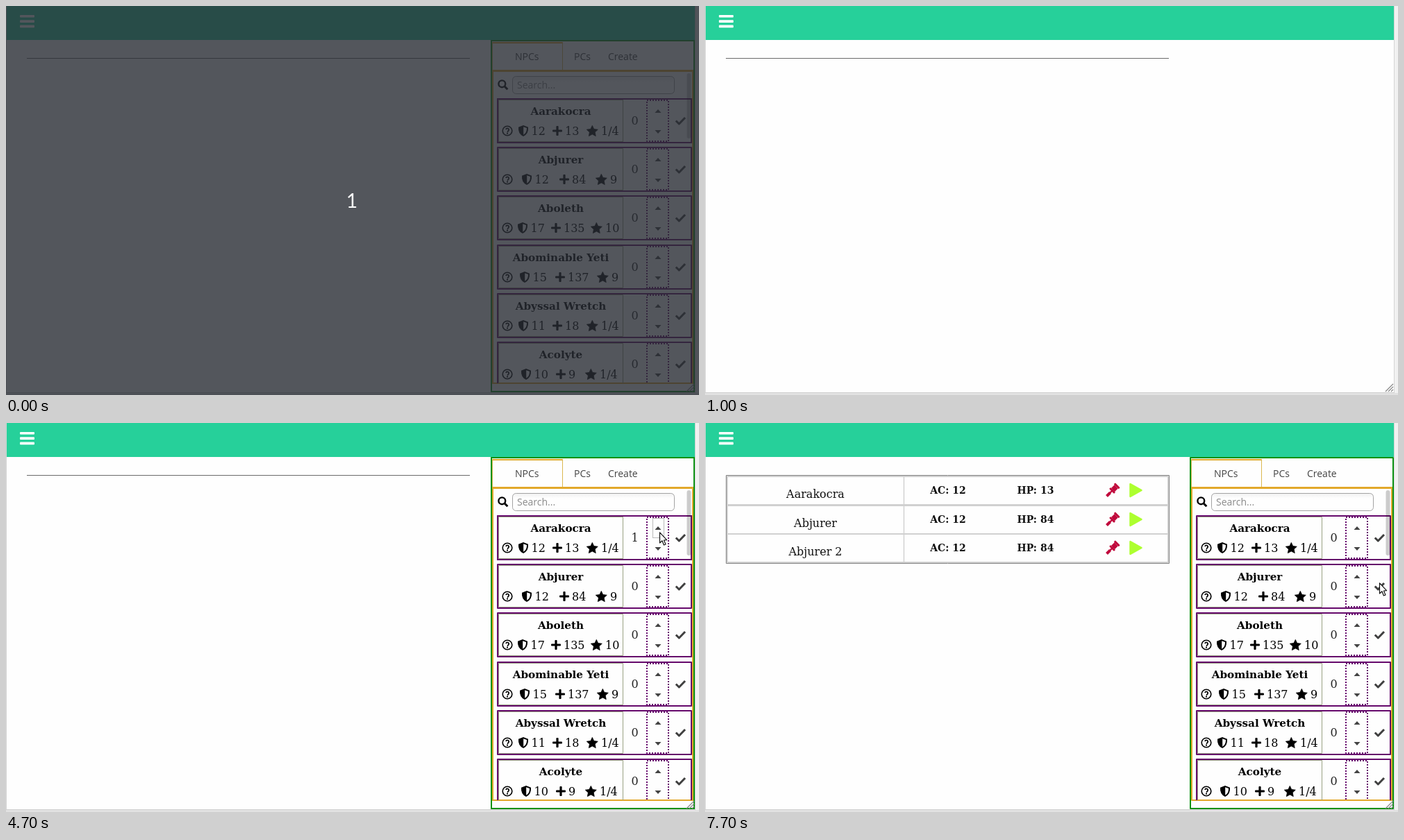
Recreate the animation shown at these times as an HTML page with a canvas. Size 998 by 561 pixels, loop 8 s.

```html
<!DOCTYPE html>
<html lang="en">
<head>
<meta charset="utf-8">
<title>Encounter tracker</title>
<style>
  html, body { margin: 0; width: 100%; height: 100%; overflow: hidden; background: #fefefe; }
  canvas { display: block; }
</style>
</head>
<body>
<canvas id="stage" width="998" height="561"></canvas>
<script>
const ctx = document.getElementById('stage').getContext('2d');
const LOOP = 8000;
const SERIF = '"DejaVu Serif", serif';
const SANS = '"Open Sans", "Noto Sans", sans-serif';
const PURPLE = '#65086b';
const GOLD = '#e2a82a';

// x: left edges of the shield, plus and star icons
const npcs = [
  { name: 'Aarakocra', ac: 12, hp: 13, cr: '1/4', x: [738, 787, 836] },
  { name: 'Abjurer', ac: 12, hp: 84, cr: '9', x: [743, 797, 849] },
  { name: 'Aboleth', ac: 17, hp: 135, cr: '10', x: [737, 785, 842] },
  { name: 'Abominable Yeti', ac: 15, hp: 137, cr: '9', x: [740, 791, 851] },
  { name: 'Abyssal Wretch', ac: 11, hp: 18, cr: '1/4', x: [738, 787, 836] },
  { name: 'Acolyte', ac: 10, hp: 9, cr: '1/4', x: [742, 792, 834] }
];

// [time, x, y] of the pointer tip, held until the next entry
const pointer = [
  [1900, 956, 164], [2100, 918, 144], [2300, 930, 145], [2400, 947, 146],
  [2700, 954, 147], [3200, 942, 145], [3300, 936, 147], [3400, 930, 150],
  [3500, 928, 151], [4700, 941, 157], [4800, 958, 167], [4900, 969, 172],
  [5700, 965, 180], [5800, 955, 199], [5900, 945, 215], [6000, 940, 223],
  [6900, 948, 226], [7000, 961, 229], [7100, 972, 230], [7200, 971, 230]
];

const between = (t, a, b) => t >= a && t < b;

function rect(color, x, y, w, h) {
  ctx.fillStyle = color;
  ctx.fillRect(x, y, w, h);
}

function frame(color, x, y, w, h, line = 1) {
  ctx.strokeStyle = color;
  ctx.lineWidth = line;
  ctx.strokeRect(x + line / 2, y + line / 2, w - line, h - line);
}

function text(str, x, y, font, color = '#000', align = 'left') {
  ctx.font = font;
  ctx.fillStyle = color;
  ctx.textAlign = align;
  ctx.fillText(str, x, y);
}

function poly(points, color) {
  ctx.beginPath();
  points.forEach(([x, y]) => ctx.lineTo(x, y));
  ctx.closePath();
  if (color) {
    ctx.fillStyle = color;
    ctx.fill();
  }
}

function lines(color, width, ...paths) {
  ctx.strokeStyle = color;
  ctx.lineWidth = width;
  ctx.beginPath();
  for (const path of paths) {
    path.forEach(([x, y], i) => i ? ctx.lineTo(x, y) : ctx.moveTo(x, y));
  }
  ctx.stroke();
}

function pill(color, x, y, w, h, r) {
  ctx.fillStyle = color;
  ctx.beginPath();
  ctx.roundRect(x, y, w, h, r);
  ctx.fill();
}

function at(x, y, draw) {
  ctx.save();
  ctx.translate(x, y);
  draw();
  ctx.restore();
}

function helpIcon(x, y) {
  ctx.strokeStyle = '#000';
  ctx.lineWidth = 1.6;
  ctx.beginPath();
  ctx.arc(x, y, 6.8, 0, Math.PI * 2);
  ctx.stroke();
  ctx.lineWidth = 1.7;
  ctx.beginPath();
  ctx.arc(x, y - 1.5, 2.1, Math.PI * 1.08, Math.PI * 2.3);
  ctx.lineTo(x, y + 1.6);
  ctx.stroke();
  rect('#000', x - 1, y + 2.6, 2, 2);
}

function shieldIcon(x, y) {
  at(x, y, () => {
    ctx.fillStyle = '#000';
    ctx.fill(new Path2D('M7-8L14-5.2Q14.8 4.5 7 8Q-.8 4.5 0-5.2Z'));
    ctx.fillStyle = '#fefefe';
    ctx.fill(new Path2D('M7.2-5.8L12-3.9Q12.2 3 7.2 5.7Z'));
  });
}

function plusIcon(x, y) {
  pill('#000', x, y - 1.6, 14, 3.2, 1);
  pill('#000', x + 5.4, y - 7, 3.2, 14, 1);
}

function starIcon(x, y) {
  const points = Array.from({ length: 10 }, (_, i) => {
    const r = i % 2 ? 4.1 : 8.4;
    const a = Math.PI * (i / 5 - 0.5);
    return [x + 8.3 + r * Math.cos(a), y + 0.8 + r * Math.sin(a)];
  });
  poly(points, '#000');
  ctx.strokeStyle = '#000';
  ctx.lineWidth = 0.8;
  ctx.lineJoin = 'round';
  ctx.stroke();
}

function gavelIcon(x, y) {
  at(x, y, () => {
    ctx.rotate(Math.PI / 4);
    const red = '#c00a3c';
    pill(red, -5, -9.6, 10, 3, 1.2);
    rect(red, -3.6, -6.6, 7.2, 6.4);
    pill(red, -5, -0.2, 10, 3, 1.2);
  });
}

function gavel(x, y) {
  gavelIcon(x + 0.5, y - 0.5);
  lines('#c00a3c', 4, [[x - 8.5, y + 8.5], [x - 3.5, y + 3.5]]);
  lines('#c00a3c', 2.4, [[x - 4, y + 4], [x + 2, y - 2]]);
}

function playIcon(x, y) {
  ctx.lineJoin = 'round';
  poly([[x + 1.5, y - 9], [x + 17.5, y], [x + 1.5, y + 9]], '#adff2f');
  ctx.strokeStyle = '#adff2f';
  ctx.lineWidth = 2.5;
  ctx.stroke();
}

function dotted(color, x, y, w, h, line) {
  ctx.setLineDash([line, line]);
  frame(color, x, y, w, h, line);
  ctx.setLineDash([]);
}

function grip() {
  lines('#888', 1.2,
    [[980, 556], [991, 545]], [[984, 556], [991, 549]], [[988, 556], [991, 553]]);
}

function blank() {
  rect('#fefefe', 0, 0, 998, 561);
  rect('#f1f1f1', 993, 0, 5, 561);
  rect('#e1e1e1', 0, 558, 998, 3);
  rect('#d4d4d4', 0, 0, 1, 558);
  rect('#d4d4d4', 992, 0, 1, 558);
  rect('#d0d0d0', 0, 557, 993, 1);
}

function header() {
  rect('#26d09a', 1, 0, 991, 49);
  for (const y of [13, 20.3, 27.6]) pill('#fff', 20, y, 21, 3.6, 1);
}

function table(count) {
  if (!count) {
    rect('#6a6a6a', 30, 75, 638, 1);
    return;
  }
  const list = [['Aarakocra', 12, 13], ['Abjurer', 12, 84], ['Abjurer 2', 12, 84]];
  const bold = 'bold 14px ' + SERIF;
  const height = Math.round(44.5 + 41.5 * (count - 1));
  frame('#858585', 30, 75, 639, height);
  for (let i = 0; i < count; i++) {
    const y = Math.round(41.5 * i);
    const [name, ac, hp] = list[i];
    frame('#d0d0d0', 31, 76 + y, 637, 43, 2);
    rect('#c2c2c2', 286, 78 + y, 1, 39);
    text(name, 159, 108 + y, '16px ' + SERIF, '#111', 'center');
    text('AC: ' + ac, 350, 102 + y, bold, '#111', 'center');
    text('HP: ' + hp, 476, 102 + y, bold, '#111', 'center');
    gavel(587, 97 + y);
    playIcon(611, 97 + y);
  }
}

function panel() {
  frame('#0b9212', 698, 49, 294, 508, 2);
  rect(GOLD, 700, 52, 102, 2);
  rect('#dcb850', 700, 52, 1, 41);
  rect('#dcb850', 801, 52, 1, 41);
  rect(GOLD, 700, 92, 290, 3);
  frame(GOLD, 700, 93, 290, 452, 2);
  text('NPCs', 733, 78, '14px ' + SANS, '#444');
  text('PCs', 818, 78, '14px ' + SANS, '#444');
  text('Create', 867, 78, '14px ' + SANS, '#444');
}

function search() {
  ctx.strokeStyle = '#000';
  ctx.lineWidth = 2.4;
  ctx.beginPath();
  ctx.arc(714.3, 112.3, 4.9, 0, Math.PI * 2);
  ctx.stroke();
  lines('#000', 3, [[717.8, 115.8], [722.3, 120.3]]);

  const shade = ctx.createLinearGradient(0, 101, 0, 127);
  shade.addColorStop(0, '#f0f0f0');
  shade.addColorStop(0.3, '#fefefe');
  pill(shade, 729.5, 101.5, 233, 25, 5);
  ctx.strokeStyle = '#a3a3a3';
  ctx.lineWidth = 1;
  ctx.stroke();
  text('Search...', 736, 119, '14px ' + SANS, '#8a8a8a');
}

function npcRow(npc, y, count, pressed) {
  const [shield, plus, star] = npc.x;
  const mid = y + 47;
  const base = y + 53;
  const num = '16px ' + SERIF;
  frame(PURPLE, 707, y, 281, 65, 2);
  frame('#9aa184', 709, y + 2, 180, 61);
  text(npc.name, 799, y + 24, 'bold 15.2px ' + SERIF, '#000', 'center');
  helpIcon(722, mid);
  shieldIcon(shield, mid);
  plusIcon(plus, mid);
  starIcon(star, mid);
  text(npc.ac, shield + 18.5, base, num);
  text(npc.hp, plus + 18, base, num);
  text(npc.cr, star + 21, base, num);

  text(count, 905.5, y + 38, num, '#222', 'center');
  dotted(PURPLE, 922, y + 2, 33, 61, 2);
  const up = y + 16 + (pressed ? 1 : 0);
  poly([[934.5, up + 5], [939, up], [943.5, up + 5]], '#444');
  poly([[934.5, y + 46], [943.5, y + 46], [939, y + 51]], '#444');
  lines('#404040', 3, [[964.8, y + 32.5], [969.3, y + 37], [978, y + 28]]);
}

function counts(t) {
  const first = between(t, 3900, 5400) ? 1 : 0;
  const second = between(t, 6400, 6500) ? 1 : between(t, 6500, 7700) ? 2 : 0;
  return [first, second];
}

function focus(t) {
  if (between(t, 3700, 5400)) dotted('#777', 931, 137, 17, 29, 1);
  if (between(t, 6200, 7400)) dotted('#777', 931, 207, 17, 29, 1);
  if (between(t, 7400, 7700)) dotted('#777', 960, 205, 22, 61, 1);
}

function list(t) {
  const value = counts(t);
  const pressed = [between(t, 3700, 3900), between(t, 6200, 6400)];
  ctx.save();
  ctx.beginPath();
  ctx.rect(702, 95, 286, 449);
  ctx.clip();
  npcs.forEach((npc, i) =>
    npcRow(npc, Math.round(133 + 70.2 * i), value[i] || 0, pressed[i]));
  focus(t);
  ctx.restore();
  pill('rgba(0,0,0,.2)', 980.5, 97, 6, 94, 3);
}

function cursor(t) {
  const spot = pointer.filter(p => p[0] <= t).pop();
  if (!spot) return;
  at(spot[1], spot[2], () => {
    ctx.lineJoin = 'round';
    poly([[0.5, 0.8], [0.5, 16], [4, 12.8], [6.4, 19], [9, 18], [6.5, 12], [10.6, 11.6]], '#fff');
    ctx.strokeStyle = '#111';
    ctx.lineWidth = 1.2;
    ctx.stroke();
  });
}

function countdown() {
  rect('rgba(40,44,52,.8)', 0, 0, 998, 561);
  text('1', 498, 291, '28px Lato, sans-serif', '#fff', 'center');
}

function draw(t) {
  const loaded = t < 500 ? 4 : Math.max(0, Math.min(4, Math.floor((t - 900) / 100)));
  blank();
  if (loaded > 0) {
    header();
    table(t < 5400 ? 0 : t < 7700 ? 1 : 3);
  }
  if (loaded > 1) panel();
  if (loaded > 2) search();
  if (loaded > 3) list(t);
  grip();
  cursor(t);
  if (t < 400) countdown();
}

const start = performance.now();
function tick() {
  draw((performance.now() - start) % LOOP);
  requestAnimationFrame(tick);
}
tick();
</script>
</body>
</html>
```
